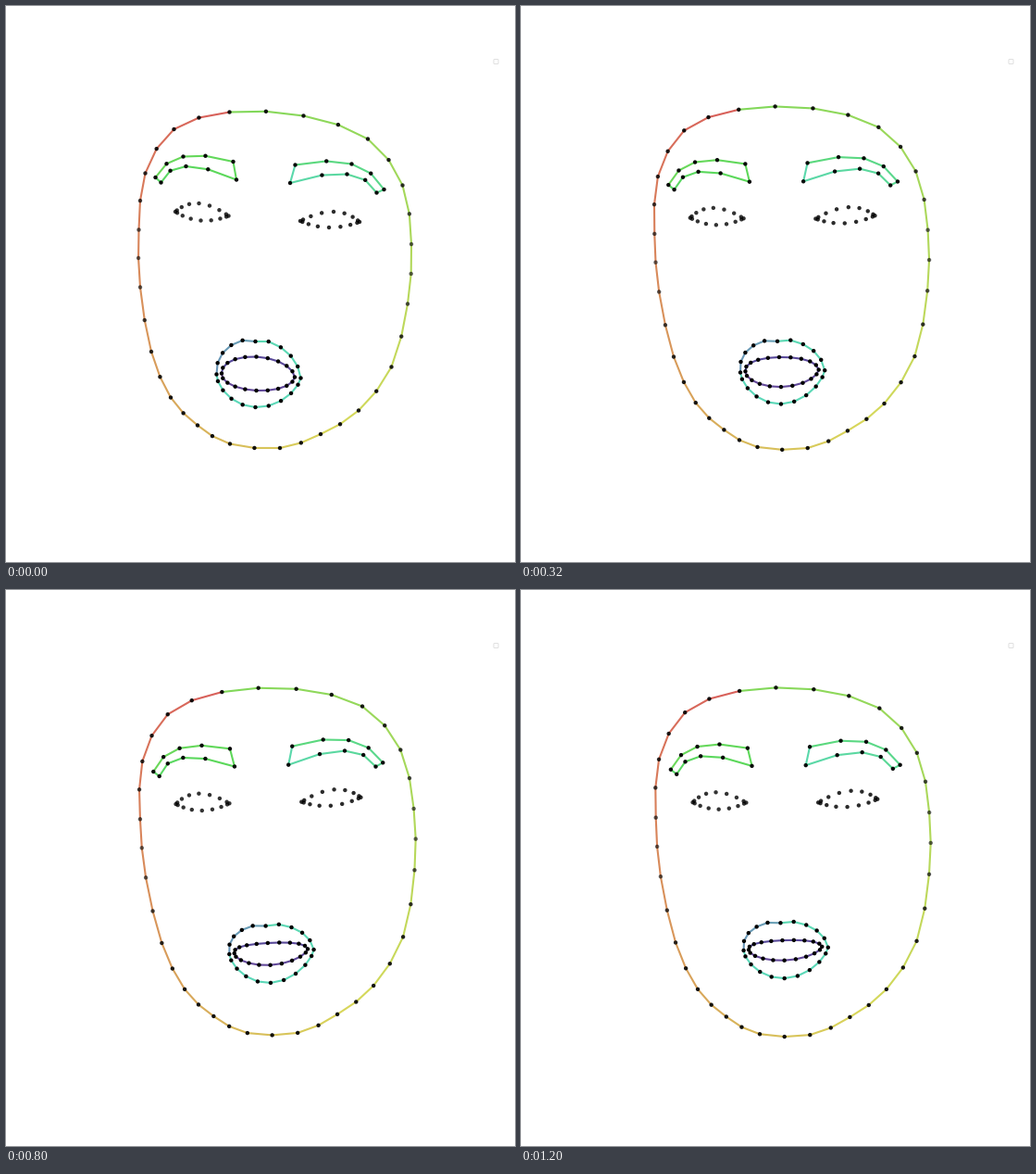
Write a matplotlib script that moves like this. It is 550 px wide and 600 px high and loops after 1280 ms.

```python
import colorsys

import matplotlib.pyplot as plt
import numpy as np
from matplotlib.animation import FuncAnimation
from matplotlib.collections import LineCollection
from matplotlib.patches import FancyBboxPatch

W, H, DPI = 550, 600, 100
FRAMES, INTERVAL = 16, 80

# head pose over time: sideways tilt, drift, closing of the mouth
KEYS = np.array([0, 2, 4, 6, 10, 13, 15])
POSES = np.column_stack([
    [0, 0.12, 0.6, 1, 0.82, 0.67, 0.65],
    [0, 0, 0.1, 0, 0.4, 1, 1.03],
    [0, 0.07, 0.3, 0.62, 0.87, 1, 1.02]])
SLOPES = np.gradient(POSES, KEYS, axis=0)

fig = plt.figure(figsize=(W / DPI, H / DPI), dpi=DPI, facecolor="white")
ax = fig.add_axes([0, 0, 1, 1])
ax.set(xlim=(-0.5, W - 0.5), ylim=(H - 0.5, -0.5))
ax.axis("off")


def hues(start, stop, n, light=0.6, sat=0.62):
    return [colorsys.hls_to_rgb(h, light, sat) for h in np.linspace(start, stop, n)]


def pose_at(frame):
    """Cubic Hermite curve through the key poses."""
    k = min(np.searchsorted(KEYS, frame, side="right") - 1, len(KEYS) - 2)
    span = KEYS[k + 1] - KEYS[k]
    u = (frame - KEYS[k]) / span
    ease = u * u * (3 - 2 * u)
    return (POSES[k] * (1 - ease) + POSES[k + 1] * ease
            + span * u * (1 - u) * ((1 - u) * SLOPES[k] - u * SLOPES[k + 1]))


def arc(start, mid, end, n, crowded=True, power=2):
    """n points from start (end left out) bulging through mid."""
    start, mid, end = np.array([start, mid, end], float)
    u = np.arange(n)[:, None] / n
    if crowded:
        u = (1 - np.cos(np.pi * u)) / 2
    bulge = (4 * u * (1 - u)) ** (power / 2)
    return start + (end - start) * u + (mid - (start + end) / 2) * bulge


def almond(left, top, right, bottom, n, top_power=2, bottom_power=2):
    return np.vstack([arc(left, top, right, n, power=top_power),
                      arc(right, bottom, left, n, power=bottom_power)])


def brow(upper, lower):
    """Two five-point curves, each given by its ends and middle."""
    return np.vstack([np.vstack([arc(*side, 4, crowded=False), side[2]])
                      for side in (upper, lower)])


def smooth_loop(corners):
    """Closed curve with one extra point between neighbouring corners."""
    p = np.array(corners, float)
    after = np.roll(p, -1, axis=0)
    between = (9 * (p + after) - np.roll(p, 1, axis=0) - np.roll(p, -2, axis=0)) / 16
    return np.stack([p, between], axis=1).reshape(-1, 2)


class Contour:
    def __init__(self, points, colors=None, shade=1.0, lift=0, drift=3, rise=0, shut=0):
        self.points = points
        self.lift, self.drift, self.rise, self.shut = lift, drift, rise, shut
        self.lines = None
        if colors is not None:
            self.lines = LineCollection([], colors=colors, linewidths=1.5, zorder=1)
            ax.add_collection(self.lines)
        dots = np.zeros((len(points), 4))
        dots[:, 3] = shade
        self.dots = ax.scatter(*points.T, s=10, c=dots, linewidths=0, zorder=2)

    def update(self, tilt, lean, closed):
        x, y = self.points.T
        p = np.column_stack([
            x + tilt * 0.092 * (y - 230) + lean * self.drift,
            y + tilt * (self.lift - 0.112 * (x - 281)) + lean * self.rise
            - closed * self.shut * (y - 398)])
        self.dots.set_offsets(p)
        if self.lines is not None:
            self.lines.set_segments(np.stack([p, np.roll(p, -1, axis=0)], axis=1))


face = smooth_loop([
    (241, 114), (181, 132.5), (150, 180), (143, 241), (144.5, 303), (156.5, 372.5),
    (177.5, 422), (206.5, 452), (241.5, 472), (295.5, 476.5), (339.5, 461.5),
    (380.5, 436), (416, 389), (433.5, 321), (437.5, 256.5), (428, 193),
    (390.5, 143), (321, 118)])
face_y = face[:, 1]

left_brow = brow([(161, 184.5), (191, 162), (245, 167.5)],
                 [(248.5, 187), (194, 172.5), (167, 190)])
right_brow = brow([(312, 171), (373, 170), (408, 197.5)],
                  [(400, 201), (368, 181), (306.5, 190.5)])
left_eye = almond((182.5, 221.5), (208, 212.5), (240, 226), (210, 231), 8)
right_eye = almond((317.5, 231.5), (353.5, 221.5), (381.5, 232.5), (348.5, 238.5), 8)

outer_lip = almond((227, 397), (269, 359), (318, 401), (269, 432.5), 10, 1, 1.3)
outer_lip[5, 1] += 2.5  # cupid's bow
inner_lip = almond((232.5, 396), (270, 378), (311.5, 400), (270, 414.5), 10, 1, 1)
# corners of the mouth rise more than its middle
mouth_lift = -5.8 - 2.5 * np.cos(2 * np.pi * np.arange(20) / 10)

contours = [
    Contour(face, hues(0.01, 0.28, 36),
            shade=0.92 - 0.32 * np.exp(-((face_y - 275) / 85) ** 2),
            lift=-8.5 + 9.5 * ((face_y - 110) / 365) ** 3,
            drift=1.5, rise=0.017 * (face_y - 280)),
    Contour(left_brow, hues(0.31, 0.35, 10), shade=0.95),
    Contour(right_brow, hues(0.38, 0.44, 10), shade=0.95),
    Contour(left_eye, shade=0.8),
    Contour(right_eye, shade=0.83),
    Contour(outer_lip, hues(0.57, 0.55, 5, 0.56, 0.35) + hues(0.45, 0.46, 15),
            lift=mouth_lift, rise=-7, shut=0.155),
    Contour(inner_lip, hues(0.69, 0.73, 20, 0.44, 0.36),
            lift=mouth_lift, rise=-7, shut=0.4),
]

# empty legend frame
ax.add_patch(FancyBboxPatch((526.5, 57), 5, 5, boxstyle="round,pad=0,rounding_size=1",
                            fc="white", ec="0.88", lw=0.72))


def draw(frame):
    pose = pose_at(frame)
    for contour in contours:
        contour.update(*pose)
    return []


anim = FuncAnimation(fig, draw, frames=FRAMES, interval=INTERVAL, repeat=True,
                     repeat_delay=0, blit=False)
plt.show()
```
